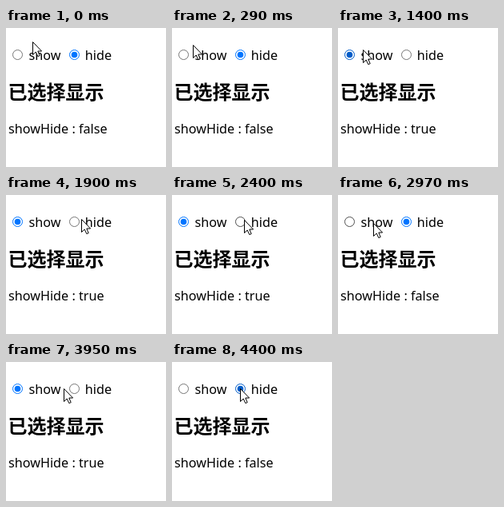
These frames come from a looping animation (200 by 174 pixels, 4600 ms). An HTML page:

```html
<!DOCTYPE html>
<html lang="zh">
<head>
<meta charset="utf-8">
<title>showHide</title>
<style>
  html, body { margin: 0; width: 100%; height: 100%; overflow: hidden; background: #fff; }
  svg { display: block; width: 200px; height: 174px; }
  text { font: 16.2px "Noto Sans", "Open Sans", sans-serif; fill: #000; }
  .heading { font: bold 24px "Noto Sans CJK SC", "Noto Sans CJK", sans-serif; }
</style>
</head>
<body>
<svg viewBox="0 0 200 174">
  <g id="show"><circle cx="14.5" cy="33.5" r="6"/><circle cx="14.5" cy="33.5" r="3.8"/></g>
  <text x="28.5" y="40">show</text>
  <g id="hide"><circle cx="85.5" cy="33.5" r="6"/><circle cx="85.5" cy="33.5" r="3.8"/></g>
  <text x="98.8" y="40">hide</text>
  <text class="heading" x="2.5" y="89">已选择显示</text>
  <text id="status" x="3" y="132"></text>
  <path id="cursor" d="M.5 .5V16.5L4.2 13L6.8 18.6L9.2 17.6L6.8 12H11.6Z" fill="#fff" stroke="#000"/>
</svg>
<script>
const LOOP = 4600, STEP = 100;
const $ = id => document.getElementById(id);

// Where the pointer goes; a stop with "shown" clicks a radio button.
const stops = [
  { at: 0, x: 33, y: 17, shown: false },
  { at: 700, x: 21, y: 24 },
  { at: 1000, x: 14, y: 31, shown: true },
  { at: 1400, x: 31, y: 27 },
  { at: 1800, x: 95, y: 30 },
  { at: 2400, x: 90, y: 31 },
  { at: 2600, x: 87, y: 33, shown: false },
  { at: 3000, x: 44, y: 35 },
  { at: 3200, x: 16, y: 34, shown: true },
  { at: 3300, x: 31, y: 34 },
  { at: 4400, x: 85, y: 33, shown: false }
];

const easeOut = k => Math.sin(k * Math.PI / 2);
const mix = (a, b, k) => Math.round(a + (b - a) * k);

function pointerAt(t) {
  const i = stops.findLastIndex(stop => stop.at <= t);
  const from = stops[i], to = stops[i + 1] || from;
  const k = to === from ? 0 : easeOut((t - from.at) / (to.at - from.at));
  return { x: mix(from.x, to.x, k), y: mix(from.y, to.y, k) };
}

// Hovering a label also highlights its radio button.
function isHovered(tip, cx, labelX, labelEnd) {
  const onButton = Math.hypot(tip.x - cx, tip.y - 33.5) < 6.5;
  const onLabel = tip.x >= labelX && tip.x < labelEnd && tip.y > 23 && tip.y < 45;
  return onButton || onLabel;
}

function drawRadio(id, checked, hovered) {
  const color = checked ? (hovered ? "#005cc8" : "#0075ff") : (hovered ? "#4f4f4f" : "#767676");
  const [ring, dot] = $(id).children;
  ring.setAttribute("fill", "#fff");
  ring.setAttribute("stroke", color);
  dot.setAttribute("fill", checked ? color : "none");
}

function render(time) {
  const t = Math.floor((time + 30) / STEP) * STEP;
  const tip = pointerAt(t);
  const { shown } = stops.findLast(stop => stop.at <= t && "shown" in stop);
  drawRadio("show", shown, isHovered(tip, 14.5, 28, 69));
  drawRadio("hide", !shown, isHovered(tip, 85.5, 99, 132));
  $("status").textContent = "showHide : " + shown;
  $("cursor").setAttribute("transform", `translate(${tip.x} ${tip.y})`);
}

const start = performance.now();
function tick() {
  render((performance.now() - start) % LOOP);
  requestAnimationFrame(tick);
}
tick();
</script>
</body>
</html>
```
